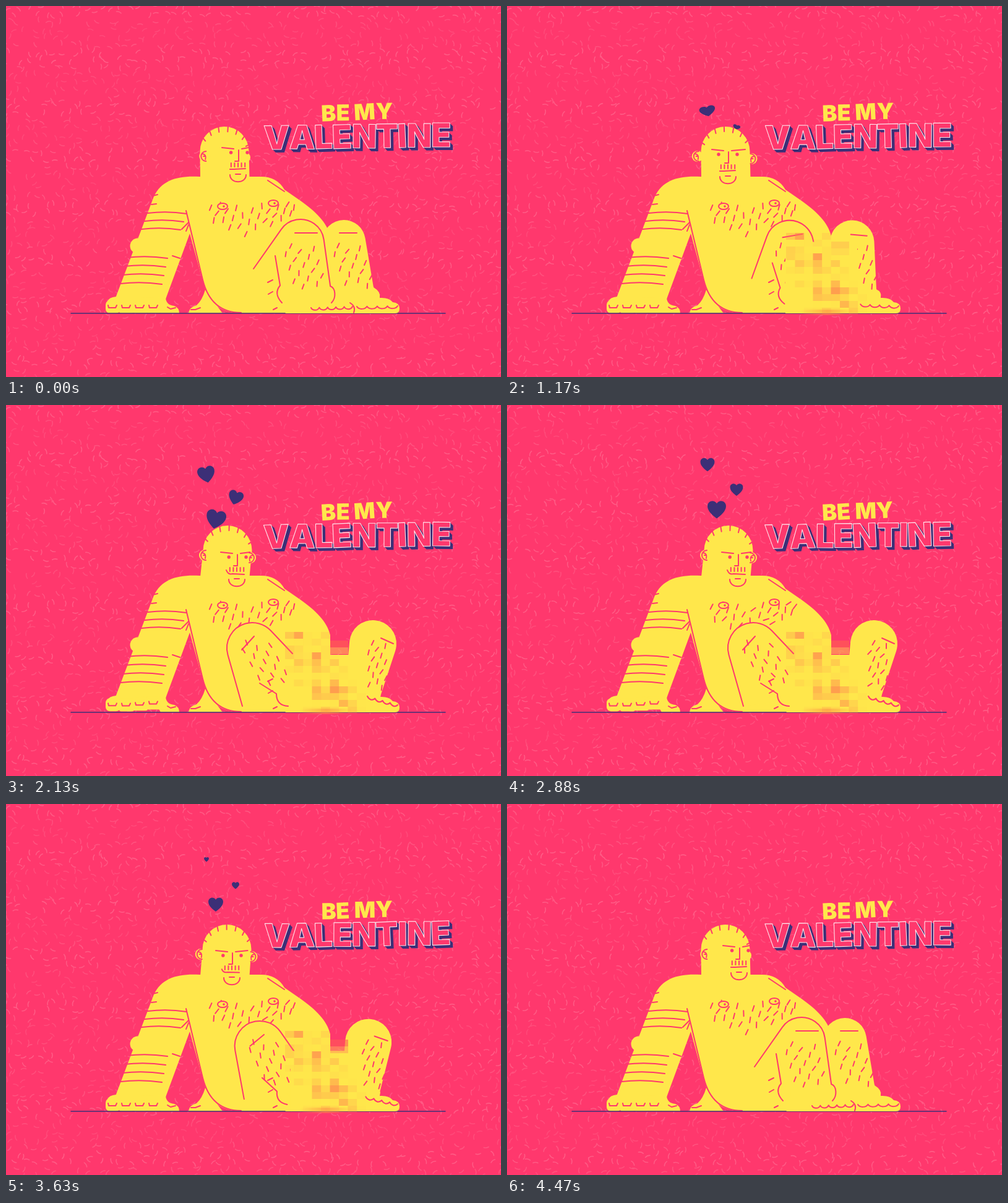
Animation of 800x600 px, one loop 4500 ms. Source, as an HTML page with a canvas:

```html
<!DOCTYPE html>
<html lang="en">
<head>
<meta charset="utf-8">
<title>Be my Valentine</title>
<style>
  html, body { margin: 0; width: 100%; height: 100%; overflow: hidden; background: #ff386d; }
  canvas { display: block; width: 800px; height: 600px; }
</style>
</head>
<body>
<canvas id="stage" width="800" height="600"></canvas>
<script>
const ctx = document.getElementById('stage').getContext('2d');
const LOOP = 4500, STEP = 30, TAU = Math.PI * 2;
const PINK = '#ff386d', YELLOW = '#ffe74b', NAVY = '#3c2f77';

const lerp = (a, b, k) => a + (b - a) * k;
const mix = (a, b, k) => a.map((v, i) => lerp(v, b[i], k));
const clamp = v => Math.max(0, Math.min(1, v));
const ramp = (t, from, to) => clamp((t - from) / (to - from));
const ease = k => k * k * (3 - 2 * k);
const hash = n => { const v = Math.sin(n * 127.1 + 11.7) * 43758.5453; return v - Math.floor(v); };
const sway = t => (1 - Math.cos(TAU * t / 1125)) / 2;

function fill(shape, color = YELLOW) {
  ctx.fillStyle = color;
  ctx.fill(new Path2D(shape));
}
function draw(shape, color = PINK, width = 2) {
  ctx.strokeStyle = color;
  ctx.lineWidth = width;
  ctx.stroke(new Path2D(shape));
}
function disc(x, y, r, color = YELLOW) {
  ctx.fillStyle = color;
  ctx.beginPath();
  ctx.arc(x, y, r, 0, TAU);
  ctx.fill();
}

// Background
function confetti(t) {
  ctx.strokeStyle = '#ff6189';
  ctx.lineWidth = 1.6;
  for (let row = 0; row < 50; row++) {
    ctx.globalAlpha = 0.65 + 0.25 * Math.sin(row * 0.95 + 1.5);
    ctx.beginPath();
    for (let col = 0; col < 54; col++) {
      const n = row * 54 + col;
      if (hash(n) < 0.25) continue;
      const x = col * 15 + hash(n + 0.3) * 13 - 4;
      const y = row * 12.3 + hash(n + 0.6) * 9 - 3;
      const a = hash(n + 0.8) * TAU + (hash(n + 0.1) - 0.5) * 2.2 * sway(t);
      const c = Math.cos(a), s = Math.sin(a);
      ctx.moveTo(x - c * 4, y - s * 4);
      ctx.quadraticCurveTo(x + s * 2, y - c * 2, x + c * 4, y + s * 4);
    }
    ctx.stroke();
  }
  ctx.globalAlpha = 1;
}

// Lettering: each letter rocks on its own baseline
function letters(text, size, tracking, cx, y, slope, t, paint) {
  ctx.font = `900 ${size}px Inter, sans-serif`;
  ctx.textAlign = 'center';
  const widths = [...text].map(ch => ctx.measureText(ch).width + tracking);
  let x = cx - widths.reduce((a, b) => a + b) / 2;
  [...text].forEach((ch, i) => {
    const mid = x + widths[i] / 2;
    ctx.save();
    ctx.translate(mid, y + (mid - cx) * slope);
    ctx.rotate(slope + 0.03 * Math.sin(TAU * t / 1125 + i * 1.9));
    paint(ch);
    ctx.restore();
    x += widths[i];
  });
}
function title(t) {
  letters('BE MY', 36, 0, 567.5, 184.5, -0.04, t, ch => {
    ctx.fillStyle = YELLOW;
    ctx.fillText(ch, 0, 0);
  });
  const word = paint => letters('VALENTINE', 53, -1.2, 568, 230, -0.015, t, paint);
  word(ch => {
    ctx.fillStyle = NAVY;
    for (let k = 1; k <= 5; k++) ctx.fillText(ch, k, k);
  });
  word(ch => {
    ctx.fillStyle = PINK;
    ctx.fillText(ch, 0, 0);
    ctx.strokeStyle = '#ffe3ea';
    ctx.lineWidth = 1.1;
    ctx.strokeText(ch, 0, 0);
  });
}

const HEARTS = [
  { x: 324, top: 85, rise: 85, size: 28, lean: -0.2, birth: 930, life: 1770 },
  { x: 371, top: 128, rise: 68, size: 24, lean: 0.3, birth: 1040, life: 2120 },
  { x: 339, top: 158, rise: 84, size: 32, lean: 0.2, birth: 1500, life: 3000 }
];
function hearts(t) {
  for (const h of HEARTS) {
    const shrink = 1 - (Math.max(0, t - 2130) / h.life) ** 2;
    const size = h.size * ramp(t, h.birth, h.birth + 260) * shrink * ramp(t, 4000, 3700);
    if (size <= 0) continue;
    ctx.save();
    ctx.translate(h.x, h.top + h.rise * Math.exp((1170 - t) / 850));
    ctx.rotate(h.lean * ramp(t, 2800, 2200));
    ctx.scale(size / 20, size / 20 * lerp(0.65, 0.95, ramp(t, 1170, 2000)));
    fill('M0 10C-4 7-10 2-10-4C-10-10-3-12 0-7C3-12 10-10 10-4C10 2 4 7 0 10Z', NAVY);
    ctx.restore();
  }
}

// Scatters swaying hairs; place(u, v) maps an even spread over the unit square
function hairs(count, t, len, angle, place) {
  ctx.strokeStyle = PINK;
  ctx.lineWidth = 2;
  ctx.beginPath();
  for (let i = 0; i < count; i++) {
    const [x, y] = place((i + 0.5) / count, (i * 0.618 + 0.2) % 1);
    const a = angle + (hash(i + 0.4) - 0.5) + sway(t) * (hash(i + 0.7) - 0.3);
    const dx = Math.cos(a) * len / 2, dy = Math.sin(a) * len / 2;
    ctx.moveTo(x - dx, y - dy);
    ctx.lineTo(x + dx, y + dy);
  }
  ctx.stroke();
}

function hand(t) {
  fill('M178 470L258 472Q259 484 272 485Q280 488 280 497H250L245 488H166L164 478Q166 471 178 470Z');
  const tapping = ramp(t, 1900, 2050) * ramp(t, 3400, 3200);
  for (let i = 0; i < 4; i++) {
    const x = 161 + i * 22;
    const lift = tapping * (3.7 + 2.3 * Math.sin(t / 120 - i * 0.8));
    ctx.fillStyle = YELLOW;
    ctx.beginPath();
    ctx.roundRect(x, 476 - lift, 24, 21, i ? 3 : 7);
    ctx.fill();
    draw(`M${x + 4} ${484 - lift}l1 4h11l2 -4`);
  }
  draw('M261 487L266 490L274 488');
}

function stripes(n, x, y, dx, dy, width) {
  for (let i = 0; i < n; i++) {
    draw(`M${x + dx * i} ${y + dy * i}q${width / 2} -4 ${width} 1`);
  }
}

function body(t) {
  fill('M295 497Q296 487 308 484Q317 476 322 459L350 497Z');
  draw('M299 491L306 491L314 488');
  disc(213, 388, 12.5);
  fill('M313 276C278 274 252 281 239 308L177 472L258 474L297 368L318 445C326 478 345 497 380 497' +
       'H524V372C519 350 500 332 476 315L450 297Q438 276 412 276Z');
  draw('M291 331L318 443C326 475 345 496 380 496');
  draw('M423 282L450 300');
  stripes(3, 229, 335, -5, 13, 63);
  stripes(4, 194, 407, -3, 14, 67);
  draw('M235 321L243 320M237 307L245 305M269 404L281 408M284 361L295 350M291 364L295 354');
  hairs(27, t, 9, -1.15, (u, v) => {
    const x = lerp(328, 468, u);
    return [x, 320 + v * (50 - Math.abs(x - 385) * 0.35)];
  });
  for (const [x, y] of [[350, 324], [432, 319]]) {
    const ring = new Path2D();
    ring.ellipse(x, y, 8, 5, 0, 0, TAU);
    fill(ring);
    draw(ring);
    disc(x + 2, y, 1.8, PINK);
  }
  hand(t);
}

// Head poses: dome x, nose x, nose y, smile
const SIDE = [353, 376, 233, 0], DOWN = [352, 361, 240, 0], FRONT = [353, 358, 236, 0];
const SMIRK = [358, 374, 242, 1], BACK = [357, 366, 241, 0.8];
const LOOKS = [[0, SIDE], [240, SIDE], [540, DOWN], [840, FRONT], [1590, FRONT],
  [2040, SMIRK], [3240, SMIRK], [3630, BACK], [4140, SIDE], [LOOP, SIDE]];

function look(t) {
  const i = LOOKS.findIndex(([end]) => end > t);
  const [from, a] = LOOKS[i - 1], [to, b] = LOOKS[i];
  return mix(a, b, ease(ramp(t, from, to)));
}

function ear(x, y, side) {
  disc(x, y, 9);
  draw(`M${x - side * 2} ${y - 8}A8 8 0 1 ${side > 0 ? 1 : 0} ${x - side * 2} ${y + 8}`);
  draw(`M${x + side * 4} ${y - 4}Q${x - side * 3} ${y - 3} ${x - side} ${y + 5}M${x - side} ${y}h${side * 3}`);
}

function head(t) {
  const [cx, nx, ny, smile] = look(t);
  const turn = nx - cx;
  const leftEar = cx - 49 + turn * 0.75, rightEar = cx + 45 - turn * 0.5;
  if (turn > 18) disc(rightEar, 245, 8.5);
  fill(`M314 278L${cx - 39.5} 235A39.5 40 0 0 1 ${cx + 39.5} 235L393.5 278Z`);
  for (let i = 0; i < 7; i++) {
    const a = -2.85 + i * 0.39 + turn / 90, c = Math.cos(a), s = Math.sin(a);
    draw(`M${cx + c * 40} ${235 + s * 40}L${cx + c * 36} ${235 + s * 32}`);
  }
  ear(leftEar, 243, -1);
  if (turn <= 18) ear(rightEar, 247, 1);

  const open = clamp(Math.abs(t - 540) / 60 - 0.6);
  for (const dx of [turn * 0.2 - 17, 14]) {
    if (open < 0.3) draw(`M${nx + dx - 4} ${ny + 4}h8`, PINK, 1.3);
    else disc(nx + dx, ny + 4, 2.7 * open, PINK);
  }
  draw(`M${nx - 27} ${ny - 4}L${nx - 8} ${ny - 2}M${nx + 5} ${ny - 2}L${nx + 30 - turn * 0.6} ${ny - 4}`);
  draw(`M${nx} ${ny}v18h-6`);
  const mx = nx - 1, lip = ny + 31;
  for (let i = -2; i <= 2; i++) draw(`M${mx + i * 5.6} ${ny + 21}v6`);
  draw(`M${mx - 13 - smile * 4} ${lip - smile * 6}Q${mx - 14} ${lip + smile * 2} ${mx - 7} ${lip}L${mx + 12} ${lip - 1 + smile * 2}`);
  draw(`M${mx - 4} ${ny + 39}h8`);
  draw(`M${mx - 13} ${ny + 40}c0 15 26 15 26 0`);
}

// A bent leg: tangents from hip and ankle to a round knee
function bentLeg([hx, hy, kx, ky, r, ax, ay], tail = []) {
  const tangent = (x, y, side) =>
    Math.atan2(y - ky, x - kx) + side * Math.acos(r / Math.hypot(x - kx, y - ky));
  const path = new Path2D();
  path.moveTo(hx, hy);
  path.arc(kx, ky, r, tangent(hx, hy, 1), tangent(ax, ay, -1));
  for (const [x, y] of [[ax, ay], ...tail]) path.lineTo(x, y);
  return path;
}

// Scalloped line of n toes
function toes(x, y, x2, y2, n) {
  const w = (x2 - x) / n, h = (y2 - y) / n;
  const scallop = `q${w * 0.15} 4 ${w / 2} ${4 + h / 2}q${w * 0.35} 0 ${w / 2} ${h / 2 - 4}`;
  draw(`M${x} ${y}` + scallop.repeat(n));
}

function shin(count, t, angle, [x1, y1, x2, y2, width]) {
  hairs(count, t, 8, angle, (u, v) =>
    [lerp(x1, x2, u) + (v - 0.5) * width, lerp(y1, y2, u)]);
}

// o runs from 0, knees together, to 1, knees apart
function legs(t, o) {
  const far = mix([511, 400, 546, 381, 35, 594, 455], [553, 407, 593, 386, 38, 606, 468], o);
  const [ax, ay] = far.slice(5);
  fill(bentLeg(far, [[600, 497], [452, 497], [500, 410], [523, 405]]));
  fill(`M${ax - 4} ${ay}H${ax}Q606 462 604 472Q619 471 625 479Q636 480 636 489Q636 497 629 497H560Z`);
  const [mx, my, mx2, my2] = mix([539, 367, 567, 367], [606, 377, 626, 386], o);
  draw(`M${mx} ${my}L${mx2} ${my2}`);
  shin(15, t, -1.1, mix([553, 385, 565, 455, 55], [603, 382, 595, 460, 34], o));
  toes(lerp(567, 584, o), lerp(486, 471, o), 633, 485, 4);

  const near = mix([400, 425, 476, 383, 38, 524, 452], [382, 487, 398, 393, 41, 463, 402], o);
  fill(bentLeg(near, [[528, 485], [452, 497], [440, 480]]));
  disc(448, lerp(467, 480, o), 11);
  fill('M440 478H550Q564 480 563 497H455Z');
  draw(bentLeg(near));
  const [nx, ny, nx2, ny2] = mix([467, 367, 503, 367], [381, 396, 401, 374], o);
  draw(`M${nx} ${ny}L${nx2} ${ny2}`);
  const [cx, cy, hx, hy, bx, by, ex, ey] =
    mix([435, 404, 443, 452, 432, 465, 446, 480], [410, 450, 437, 467, 437, 486, 456, 487], o);
  draw(`M${cx} ${cy}L${hx} ${hy}Q${bx} ${by} ${ex} ${ey}`);
  draw('M423 447l8-4M424 466l7-4M432 491l6-3');
  shin(16, t, lerp(-1.1, -1.9, o), mix([478, 386, 482, 456, 60], [406, 382, 428, 452, 60], o));
  if (o < 0.15) {
    draw('M524 453C533 456 534 472 526 480');
    toes(493, 488, 560, 486, 5);
  }
  draw('M556 480Q566 486 562 496');
  mosaic(o);
}

function mosaic(o) {
  const show = ramp(o, 0.04, 0.18);
  if (!show) return;
  ctx.globalAlpha = show;
  const left = lerp(446, 462, o), top = lerp(374, 404, o);
  fill(`M${left} ${top}H566V497H${left}Z`);
  for (let row = 0; row < 12; row++) {
    for (let col = 0; col < 9; col++) {
      const x = 451 + col * 14.5, y = 367 + row * 11;
      const off = (x - 497 - (y - 425) * 0.5) / 34;
      const near = Math.exp(-off * off);
      const warm = hash(row * 17 + col * 3.3);
      if (near < 0.12) continue;
      ctx.fillStyle = `rgba(255,${Math.round(165 - warm * 45)},80,${0.75 * near * warm * warm})`;
      ctx.fillRect(x, y, 14.6, 11);
    }
  }
  // belly and background showing through the top of the blur
  for (let i = 0; i < 2; i++) {
    ctx.fillStyle = `rgba(255,${90 + 75 * i},85,${0.7 * o})`;
    ctx.fillRect(524, 381 + 11 * i, 29, 11);
  }
  const glow = ctx.createLinearGradient(475, 0, 560, 0);
  [0, 0.5, 0].forEach((a, i) => glow.addColorStop(i / 2, `rgba(255,140,70,${a})`));
  ctx.fillStyle = glow;
  ctx.fillRect(475, 491, 85, 9);
  ctx.globalAlpha = 1;
}

function render(now) {
  const t = Math.floor((now % LOOP) / STEP) * STEP;
  ctx.lineCap = ctx.lineJoin = 'round';
  ctx.fillStyle = PINK;
  ctx.fillRect(0, 0, 800, 600);
  confetti(t);
  title(t);
  hearts(t);
  body(t);
  head(t);
  draw('M105 497H710', NAVY, 1.5);
  legs(t, ease(ramp(t, 950, 1625)) * ease(ramp(t, 4230, 3430)));
}

const start = performance.now();
function tick() {
  render(performance.now() - start);
  requestAnimationFrame(tick);
}
tick();
</script>
</body>
</html>
```
